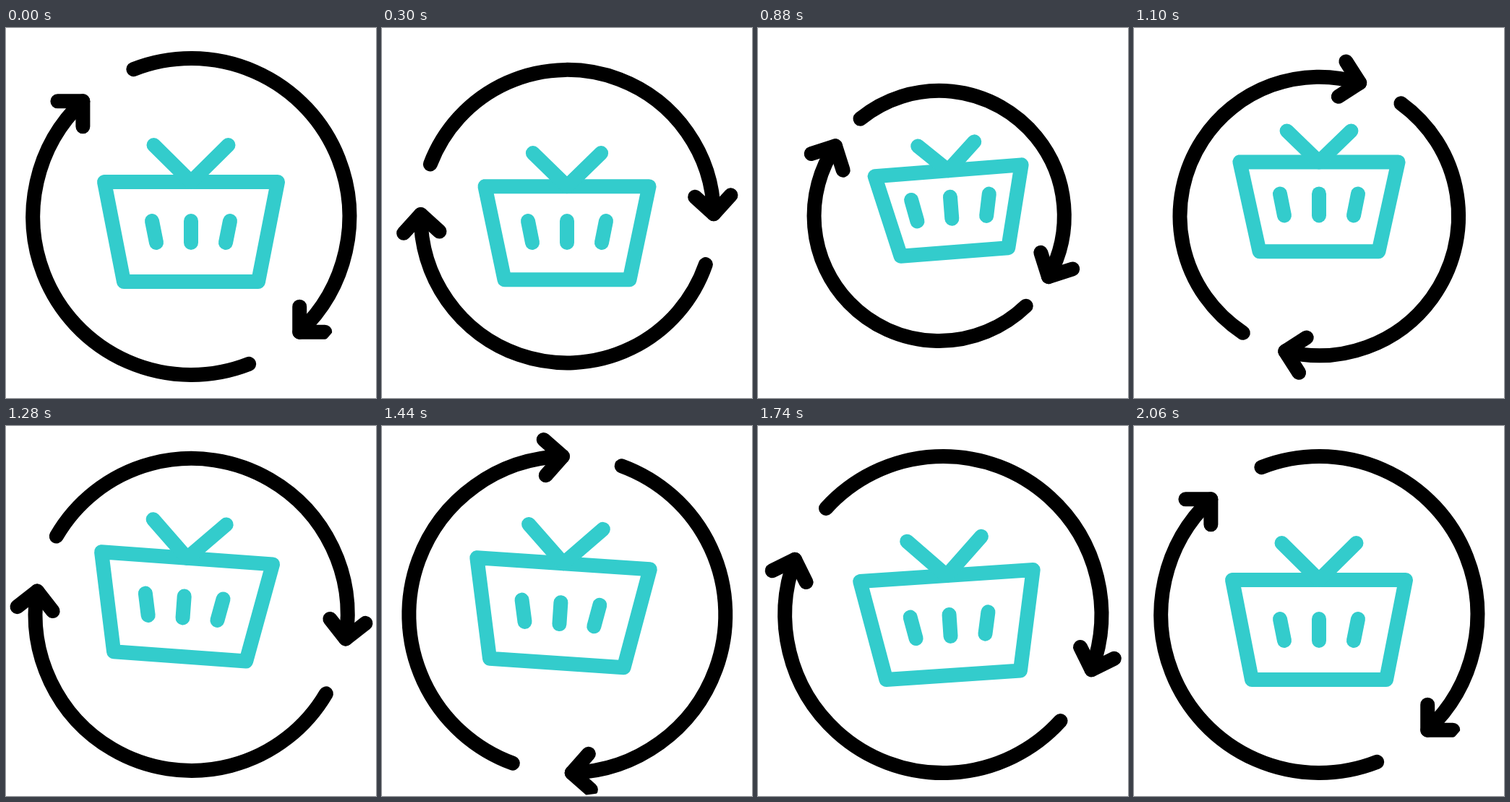
Animation, 512 px wide and 512 px high, one loop 2.82 s. Source, as an HTML page with a canvas:

```html
<!DOCTYPE html>
<html lang="en">
<head>
<meta charset="utf-8">
<title>Basket refresh</title>
<style>
  html, body { margin: 0; height: 100%; overflow: hidden; background: #fff; }
  canvas { display: block; width: 100vw; height: 100vh; }
</style>
</head>
<body>
<canvas width="512" height="512"></canvas>
<script>
const ctx = document.querySelector('canvas').getContext('2d');
const LOOP = 2820, STEP = 20, RADIUS = 219, RAD = Math.PI / 180;
const TAIL = -111.4, TIP = 46.8, PULL = 57;
const BEGIN = 200, REST = 480, RELEASE = 540, END = 2060;

const progress = (t, from, to) => Math.min(1, Math.max(0, (t - from) / (to - from)));
const ease = (t, from, to) => (1 - Math.cos(Math.PI * progress(t, from, to))) / 2;

// Wind back quickly, then spin forward through a full turn
function spin(t) {
  const back = 1 - (1 - progress(t, BEGIN, 420)) ** 3;
  const forward = 1 - (1 - progress(t, 500, END) ** 2.5) ** 3.33;
  return (360 + PULL) * forward - PULL * back;
}

const shrink = t => .262 * ease(t, BEGIN, REST) * (1 - progress(t, RELEASE, 1300) ** 2);
const lift = t => 38.5 * (ease(t, 500, 1000) - ease(t, 1000, 2000));
const tilt = t => -4.6 * Math.sin(3 * Math.PI * progress(t, RELEASE, END) ** 1.1);

function line(...points) {
  ctx.beginPath();
  points.forEach(([x, y]) => ctx.lineTo(x, y));
  ctx.stroke();
}

function arrow(turn, radius, extra) {
  const tip = (TIP + extra) * RAD;
  ctx.save();
  ctx.rotate(turn * RAD);
  ctx.beginPath();
  ctx.arc(0, 0, radius, (TAIL - extra) * RAD, tip);
  ctx.stroke();
  ctx.translate(radius * Math.cos(tip), radius * Math.sin(tip));
  line([0, -35], [0, 0], [35, 0]);
  ctx.restore();
}

// The outline tightens with q while the bars keep their size
function basket(q) {
  const rimX = 120 - 87 * q, rimY = -69 + 83 * q;
  const baseX = 93 - 88 * q, baseY = 69 - 36 * q;
  const gripX = 51.5 - 59 * q, gripY = -120 + 150 * q;
  ctx.beginPath();
  ctx.moveTo(-rimX, rimY);
  ctx.lineTo(rimX, rimY);
  ctx.lineTo(baseX, baseY);
  ctx.lineTo(-baseX, baseY);
  ctx.closePath();
  ctx.stroke();
  line([-gripX, gripY], [0, rimY], [gripX, gripY]);
  for (const side of [-1, 0, 1]) line([side * 54, -15], [side * 48, 15]);
}

function draw(now) {
  const t = Math.floor(now % LOOP / STEP) * STEP;
  const q = shrink(t), radius = RADIUS * (1 - q), lean = tilt(t);
  ctx.clearRect(0, 0, 512, 512);
  ctx.save();
  ctx.beginPath();
  ctx.arc(256, 256, 256, 0, 2 * Math.PI);
  ctx.clip();
  ctx.lineWidth = 20;
  ctx.lineCap = ctx.lineJoin = 'round';

  // The small ring drifts with the leaning basket
  ctx.save();
  ctx.translate(256.3 + 6 * q * lean, 261 - 5 * q);
  ctx.strokeStyle = '#000';
  arrow(spin(t), radius, 0);
  arrow(spin(t) + 180, radius, 23 * q);
  ctx.restore();

  // The basket swings from a point above its handle
  ctx.translate(256 - 143 * Math.sin(lean * RAD), 282 - lift(t));
  ctx.rotate(lean * RAD);
  ctx.strokeStyle = '#33cccc';
  basket(q);
  ctx.restore();
}

const start = performance.now();
function tick() {
  draw(performance.now() - start);
  requestAnimationFrame(tick);
}
tick();
</script>
</body>
</html>
```
